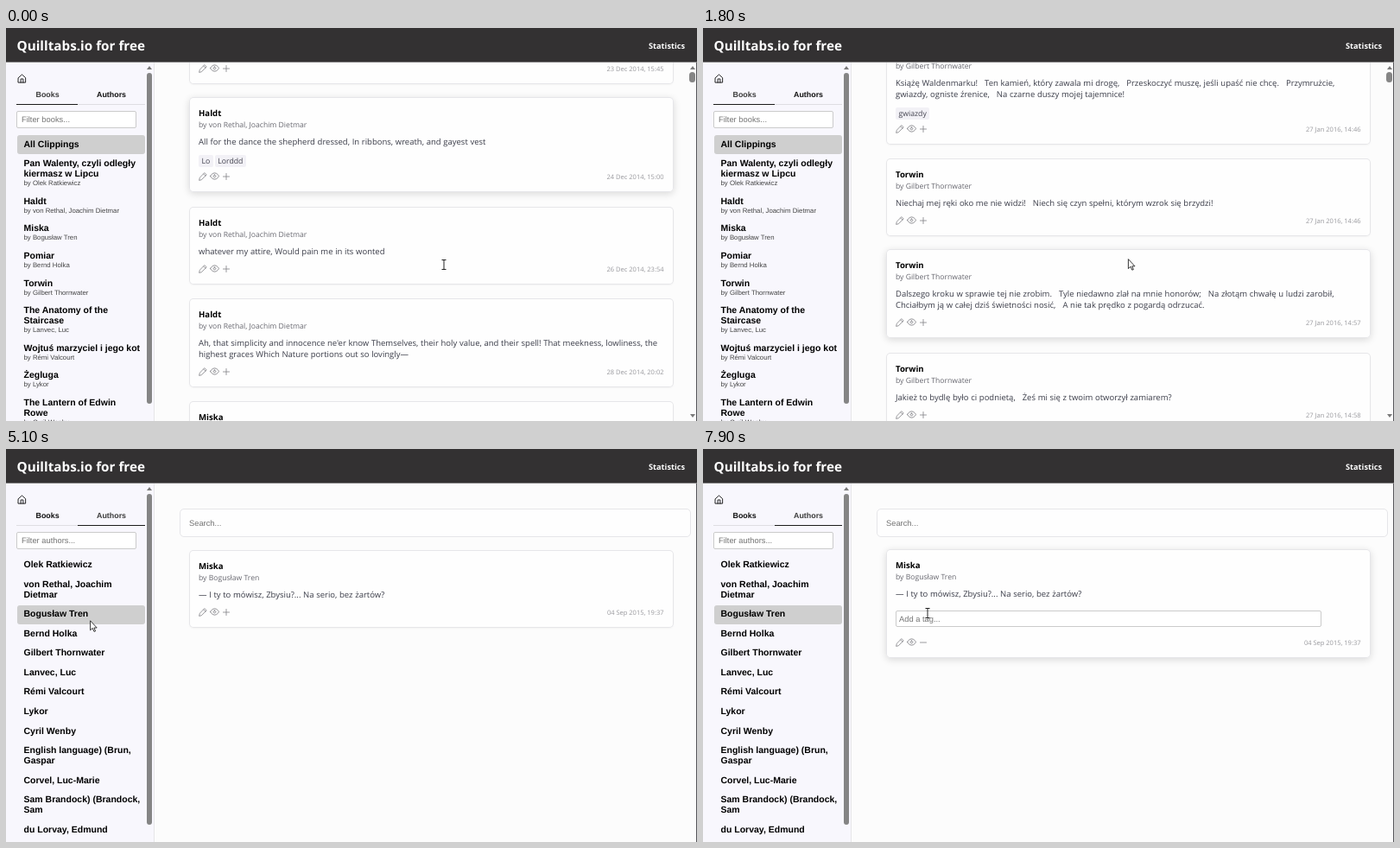
Recreate the animation shown at these times as an HTML page. Size 800x455 px, loop 8000 ms.

```html
<!DOCTYPE html>
<html lang="en">
<head>
<meta charset="utf-8">
<title>Quilltabs.io for free</title>
<style>
  html, body { margin: 0; width: 100%; height: 100%; overflow: hidden; background: #fcfcfc; }
  #stage { position: relative; width: 800px; height: 455px; overflow: hidden; background: #fcfcfc;
    font-family: "Open Sans", "Noto Sans", sans-serif; text-rendering: geometricPrecision; }
  #stage div, #stage svg { position: absolute; box-sizing: border-box; }
  .t { line-height: 20px; white-space: pre; }
  .row, .by, .tab, .hint { font-family: "Liberation Sans", Arial, sans-serif; }
  #head { left: 0; top: 0; width: 800px; height: 40px; background: #333132; color: #fff; font-weight: 700;
    border-bottom: 1px solid #858485; }
  .brand { font-size: 15.28px; }
  .link { font-size: 9.18px; }
  #side { left: 0; top: 40px; width: 172px; height: 415px; background: #f8f7fd; border-right: 1px solid #e6e6e8; }
  #side > .layer, #main > .layer { left: 0; top: -40px; width: 100%; height: 455px; }
  #main { left: 172px; top: 40px; width: 628px; height: 415px; overflow: hidden; }
  #main > .layer { left: -172px; width: 800px; }
  .tab { font-size: 8.9px; font-weight: 700; color: #111; }
  .tab.on { color: #3c3c3c; }
  .row { font-size: 10.5px; font-weight: 700; color: #000; }
  .by { font-size: 7.8px; color: #444; }
  .bar { left: 13px; width: 148px; border-radius: 3px; }
  .hint { font-size: 9.33px; color: #757575; }
  .field { background: #fff; border: 1px solid #cbcbcb; border-radius: 2px; }
  .card { left: 212px; width: 561px; border-radius: 5px; background: #fefefe;
    box-shadow: inset 0 0 0 1px #e6e6e9,
      0 calc(1px + 1px * var(--h, 0)) calc(2px + 6px * var(--h, 0)) rgba(0,0,0,calc(.04 + .1 * var(--h, 0))); }
  .title { font-size: 9.6px; font-weight: 700; color: #000; }
  .author { font-size: 8.62px; color: #686870; }
  .quote { font-size: 9.5px; word-spacing: .02em; color: #3b3d49; }
  .tag { font-size: 8.7px; line-height: 14px; padding: 0 3.5px; background: #f2f1f6; color: #444450; border-radius: 2px; white-space: pre; }
  .date { font-size: 7.53px; color: #98989d; }
  .icon { fill: none; stroke: #85858a; stroke-width: 2; stroke-linecap: round; stroke-linejoin: round; }
  .thumb { background: #858585; border-radius: 4px; }
  .hide { display: none; }
</style>
</head>
<body>
<div id="stage"></div>
<script>
const LOOP = 8000, STEP = 100;
const AUTHORS_AT = 3000, FILTER_AT = 4500, TAG_AT = 7300;

const text = (cls, x, y, s) => `<div class="t ${cls}" style="left:${x}px;top:${y - 10}px">${s}</div>`;
const textRight = (cls, right, y, s) => `<div class="t ${cls}" style="right:${right}px;top:${y - 10}px">${s}</div>`;
const box = (cls, x, y, w, h, inner = "", css = "") =>
  `<div class="${cls}" style="left:${x}px;top:${y}px;width:${w}px;height:${h}px;${css}">${inner}</div>`;
const icon = (cx, cy, d, size = 10, css = "") =>
  `<svg class="icon" viewBox="0 0 24 24" style="left:${cx - size / 2}px;top:${cy - size / 2}px;width:${size}px;height:${size}px;${css}"><path d="${d}"/></svg>`;
const triangle = (cx, cy, dir) =>
  `<svg style="left:${cx - 3}px;top:${cy - 2}px;width:6px;height:4px" viewBox="-3 -2 6 4"><path fill="#7a7a7a" d="M-3 ${2 * dir}H3L0 ${-2 * dir}Z"/></svg>`;

const ICONS = {
  pencil: "M17 2l5 5L8 21l-6.5 1.5L3 16zM14 5l5 5",
  eye: "M1 12s4-8 11-8 11 8 11 8-4 8-11 8S1 12 1 12zM12 9a3 3 0 1 0 .01 0z",
  plus: "M12 3.5v17M3.5 12h17",
  minus: "M3.5 12h17",
  home: "M3 10l9-8 9 8v12H3zM9 22v-9h6v9",
};

const BOOKS = [
  ["Pan Walenty, czyli odległy|kiermasz w Lipcu", "Olek Ratkiewicz"],
  ["Haldt", "von Rethal, Joachim Dietmar"],
  ["Miska", "Bogusław Tren"],
  ["Pomiar", "Bernd Holka"],
  ["Torwin", "Gilbert Thornwater"],
  ["The Anatomy of the|Staircase", "Lanvec, Luc"],
  ["Wojtuś marzyciel i jego kot", "Rémi Valcourt"],
  ["Żegluga", "Lykor"],
  ["The Lantern of Edwin|Rowe", "Cyril Wenby"],
];
const AUTHORS = ["Olek Ratkiewicz", "von Rethal, Joachim|Dietmar", "Bogusław Tren", "Bernd Holka",
  "Gilbert Thornwater", "Lanvec, Luc", "Rémi Valcourt", "Lykor", "Cyril Wenby",
  "English language) (Brun,|Gaspar", "Corvel, Luc-Marie", "Sam Brandock) (Brandock,|Sam", "du Lorvay, Edmund"];
const PICKED = 2;

// book index, quote lines, date, tags
const MISKA = [2, "— I ty to mówisz, Zbysiu?... Na serio, bez żartów?", "04 Sep 2015, 19:37"];
const CLIPS = [
  [1, "", "23 Dec 2014, 15:45"],
  [1, "All for the dance the shepherd dressed, In ribbons, wreath, and gayest vest", "24 Dec 2014, 15:00", ["Lo", "Lorddd"]],
  [1, "whatever my attire, Would pain me in its wonted", "26 Dec 2014, 23:54"],
  [1, "Ah, that simplicity and innocence ne'er know Themselves, their holy value, and their spell! That meekness, lowliness, the|highest graces Which Nature portions out so lovingly—", "28 Dec 2014, 20:02"],
  MISKA,
  [3, "Sąd niczego od ciebie nie chce. Przyjmuje cię, gdy przychodzisz, wypuszcza, gdy odchodzisz.", "22 Jan 2016, 16:09"],
  [4, "Książę Waldenmarku!   Ten kamień, który zawala mi drogę,   Przeskoczyć muszę, jeśli upaść nie chcę.   Przymrużcie,|gwiazdy, ogniste źrenice,   Na czarne duszy mojej tajemnice!", "27 Jan 2016, 14:46", ["gwiazdy"]],
  [4, "Niechaj mej ręki oko me nie widzi!   Niech się czyn spełni, którym wzrok się brzydzi!", "27 Jan 2016, 14:46"],
  [4, "Dalszego kroku w sprawie tej nie zrobim.   Tyle niedawno zlał na mnie honorów;   Na złotąm chwałę u ludzi zarobił,|Chciałbym ją w całej dziś świetności nosić,   A nie tak prędko z pogardą odrzucać.", "27 Jan 2016, 14:57"],
  [4, "Jakież to bydlę było ci podnietą,   Żeś mi się z twoim otworzył zamiarem?", "27 Jan 2016, 14:58"],
];

function card(id, top, [book, quote, date, tags], editing = false) {
  const lines = quote.split("|");
  const wrap = 13 * (lines.length - 1);
  const extra = wrap + (tags ? 20 : 0) + (editing ? 36 : 0);
  const [name, author] = BOOKS[book];
  let s = text("title", 11, 18.5, name) + text("author", 11, 31.5, "by " + author);
  lines.forEach((line, i) => s += text("quote", 11, 51.7 + 13.2 * i, line));
  if (tags) {
    s += `<div style="left:11px;top:${66.5 + wrap}px;display:flex;gap:2px">` +
      tags.map(tag => `<span class="tag">${tag}</span>`).join("") + "</div>";
  }
  if (editing) s += box("field", 11, 71, 493, 19) + text("hint", 15, 80.5, "Add a tag...");
  const y = 71.5 + extra;
  s += icon(15.7, y, ICONS.pencil) + icon(29.3, y, ICONS.eye, 11) + icon(43, y, editing ? ICONS.minus : ICONS.plus);
  s += textRight("date", 11.5, y + 1.5, date);
  const height = 90 + extra;
  return { html: `<div class="card" id="${id}" style="top:${top}px;height:${height}px">${s}</div>`, height };
}

function clipList() {
  let y = -25, html = "";
  CLIPS.forEach((clip, i) => {
    const c = card("clip" + i, y, clip);
    html += c.html;
    y += c.height + 16;
  });
  return html;
}

// Sidebar rows, with the bounds needed for hover bars
const rows = [];
function rowHtml(label, y) {
  return label.split("|").map((line, i) => text("row", 20.5, y + 11.9 * i, line)).join("");
}
function bookList() {
  let y = 157;
  let html = box("bar", 13, 124, 148, 22, "", "background:#cfcfcf") + rowHtml("All Clippings", 134.5);
  for (const [name, author] of BOOKS) {
    const wrap = name.includes("|") ? 11.9 : 0;
    html += rowHtml(name, y) + text("by", 20.5, y + wrap + 11, "by " + author);
    y += 31.65 + wrap;
  }
  return html;
}
function authorList() {
  let y = 134.2, html = "";
  AUTHORS.forEach((name, i) => {
    const wrap = name.includes("|") ? 11.9 : 0;
    rows.push([y - 10.7, 22 + wrap]);
    html += `<div class="bar" id="bar${i}" style="top:${y - 10.7}px;height:${22 + wrap}px"></div>` + rowHtml(name, y);
    y += 22.55 + wrap;
  });
  return html;
}

const panel = (id, hint, on, list) => {
  const [x, w] = on ? [83, 78] : [12, 71];
  return `<div class="layer" id="${id}">` +
    text("tab" + (on ? "" : " on"), 34.5, 77, "Books") + text("tab" + (on ? " on" : ""), 105, 77, "Authors") +
    box("", 12, 88, 149, 1, "", "background:#dedee2") + box("", x, 88, w, 1, "", "background:#1c1c1c") +
    box("field", 12, 95.5, 139, 20) + text("hint", 18, 106, hint) + list + "</div>";
};

const POINTERS = {
  beam: `<path fill="none" stroke="#222" d="M-2.5 -5.5H2.5M0 -5.5V5.5M-2.5 5.5H2.5"/>`,
  arrow: `<path fill="#fff" stroke="#222" stroke-width=".9" d="M0 0V11L2.6 8.6L4.4 12.6L6 12L4.3 8.2H7.6Z"/>`,
  hand: `<path fill="#fff" stroke="#222" stroke-width=".9" d="M-1.5 1Q-1.5 0 -.4 0T.8 1V5L5.2 6Q6.4 6.4 6 8.5L5 13H-1L-4.4 8.2Q-4.8 6.6 -3.4 6.8L-1.5 8.2Z"/>`,
};

const stage = document.getElementById("stage");
stage.innerHTML =
  `<div id="main">
    <div class="layer" id="all"><div id="list" style="left:0;top:0;width:800px">${clipList()}</div>
      ${triangle(794.5, 45.5, 1)}${triangle(794.5, 449, -1)}${box("thumb", 791, 51, 7, 12)}</div>
    <div class="layer" id="found">${box("", 201, 69, 592, 33, "", "background:#fefefe;border:1px solid #e6e6e9;border-radius:5px")}
      ${text("hint", 212, 86, "Search...")}
      ${card("plain", 117, MISKA).html}${card("edit", 117, MISKA, true).html}</div>
  </div>
  <div id="side">
    ${panel("books", "Filter books...", false, bookList())}
    ${panel("authors", "Filter authors...", true, authorList())}
    <div class="layer">${icon(18, 58.5, ICONS.home, 11, "stroke:#111")}
      ${triangle(166, 45.5, 1)}${box("thumb", 163, 51.5, 6, 383)}</div>
  </div>
  <div id="head">${text("brand", 12.5, 20.5, "Quilltabs.io for free")}${textRight("link", 14, 20.5, "Statistics")}</div>
  ${box("", 799, 40, 1, 415, "", "background:#55555a")}
  <svg style="left:0;top:0;width:800px;height:455px"><g id="pointer">
    ${Object.entries(POINTERS).map(([k, p]) => `<g id="${k}">${p}</g>`).join("")}</g></svg>`;

const $ = id => document.getElementById(id);
const show = (id, on) => $(id).classList.toggle("hide", !on);

const SCROLL = [[0, 0], [300, 105], [600, 240], [1100, 527], [1200, 550], [1400, 632]];
const PATH = [[0, 507, 274], [1700, 507, 274], [2600, 81, 88], [2900, 116, 79], [3300, 116, 79],
  [4000, 67, 198], [4800, 67, 198], [6100, 293, 204], [6700, 255, 188], [7400, 255, 188], [7800, 260, 190]];
const SHAPES = [[0, "beam"], [1800, "arrow"], [2700, "hand"], [3400, "arrow"], [3600, "hand"],
  [5100, "arrow"], [6600, "hand"], [TAG_AT, "beam"]];
// card, hover start, hover end
const HOVERS = [["clip1", -500, 100], ["clip8", 1500, 1900], ["plain", 6000, 9000], ["edit", 6000, 9000]];

const clamp = v => Math.max(0, Math.min(1, v));
const ease = p => p * p * (3 - 2 * p);
function track(keys, t, curve = p => p) {
  const i = keys.findIndex(k => k[0] > t);
  if (i < 0) return keys[keys.length - 1].slice(1);
  const a = keys[i - 1], b = keys[i];
  const p = curve((t - a[0]) / (b[0] - a[0]));
  return a.slice(1).map((v, j) => v + (b[j + 1] - v) * p);
}

function render(t) {
  const [scroll] = track(SCROLL, t);
  $("list").style.transform = `translateY(${-Math.round(scroll)}px)`;

  const byAuthor = t >= AUTHORS_AT, filtered = t >= FILTER_AT, tagging = t >= TAG_AT;
  show("books", !byAuthor);
  show("authors", byAuthor);
  show("all", !filtered);
  show("found", filtered);
  show("plain", !tagging);
  show("edit", tagging);

  const [x, y] = track(PATH, t, ease);
  $("pointer").setAttribute("transform", `translate(${x.toFixed(1)} ${y.toFixed(1)})`);
  const shape = SHAPES.filter(s => s[0] <= t).pop()[1];
  for (const k in POINTERS) show(k, k === shape);

  rows.forEach(([top, h], i) => {
    const over = x > 13 && x < 161 && y >= top && y < top + h + .5;
    $("bar" + i).style.background = filtered && i === PICKED ? "#cfcfcf" : over ? "#dedede" : "none";
  });

  for (const [id, from, to] of HOVERS) {
    const h = clamp((t - from) / 200) * clamp(1 - (t - to) / 200);
    $(id).style.setProperty("--h", h);
    $(id).style.transform = h > .6 ? "translateY(-1px)" : "none";
  }
}

const start = performance.now();
function frame() {
  const t = (performance.now() - start) % LOOP;
  render(Math.floor(t / STEP) * STEP);
  requestAnimationFrame(frame);
}
frame();
</script>
</body>
</html>
```
